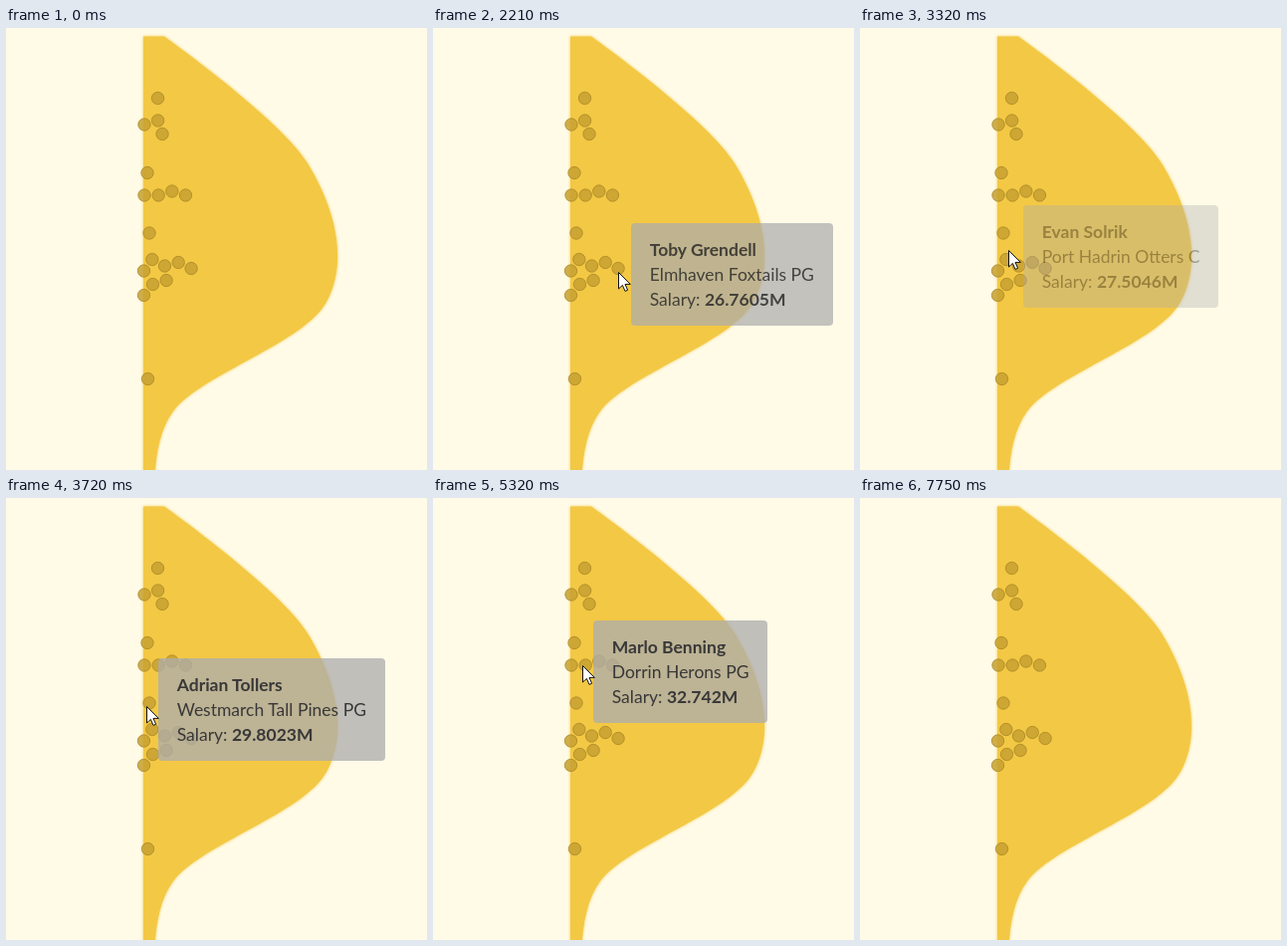
An HTML page for the animation above (8.38 s loop, 423 by 444 pixels).

```html
<!DOCTYPE html>
<html lang="en">
<head>
<meta charset="utf-8">
<title>Salary distribution</title>
<style>
html, body { margin: 0; width: 100%; height: 100%; overflow: hidden; background: #fffbe7; }
svg { position: absolute; left: 0; top: 0; }
#area { fill: #f3c844; filter: drop-shadow(0 0 1.5px #f3c844); }
#tip {
  position: absolute; left: 0; top: 0; padding: 14px 18.75px;
  border-radius: 4px; background: rgba(173, 173, 173, .77); color: #383838;
  font: 17.5px/25px Lato, sans-serif; white-space: nowrap;
}
</style>
</head>
<body>
<svg width="423" height="444">
  <path id="area"/>
  <g id="dots" fill="rgba(197,160,48,.85)" stroke="rgba(172,137,40,.8)"></g>
</svg>
<div id="tip"></div>
<svg width="423" height="444">
  <path id="pointer" d="M.5 .5V17L4.4 13.4L7 19.4L9.6 18.3L7 12.4H12.3Z" fill="#fff" stroke="#111"/>
</svg>
<script>
const LOOP = 8380, FADE = 190, AXIS = 138, LINK = 14.2;
const $ = id => document.getElementById(id);
const clamp = v => Math.max(0, Math.min(1, v));

// Density outline: a Catmull-Rom spline through a few points
function spline(points) {
  const pull = i => [0, 1].map(n =>
    points[i - 1] && points[i + 1] ? (points[i + 1][n] - points[i - 1][n]) / 6 : 0);
  return points.slice(1).map((p, i) => {
    const a = points[i], u = pull(i), v = pull(i + 1);
    return `C${a[0] + u[0]} ${a[1] + u[1]} ${p[0] - v[0]} ${p[1] - v[1]} ${p}`;
  }).join('');
}
const outline = [[159, 8.5], [303, 136], [322, 275], [168, 385], [152, 500]];
$('area').setAttribute('d', `M${AXIS} 8.5H159${spline(outline)}H${AXIS}Z`);

// Each swarm starts near the axis; every further dot touches the one before it
function swarm(inset, ...ys) {
  let x = AXIS + inset;
  ys.forEach((y, i) => {
    if (i) x += Math.sqrt(LINK ** 2 - (y - ys[i - 1]) ** 2);
    $('dots').innerHTML += `<circle cx="${x}" cy="${y}" r="6.2"/>`;
  });
}
swarm(14.5, 70.5);
swarm(1, 97, 93, 106.5);
swarm(4, 145.5);
swarm(1, 168, 168, 164, 168);
swarm(6, 206);
swarm(.5, 244, 232.5, 239, 235.5, 241.5);
swarm(.5, 268.5, 257.5, 253.5);
swarm(4.5, 352.5);

// The pointer rests at `at` from `on` to `off` while the tip at `box` is open
const visits = [
  { on: 1120, off: 2200, at: [188, 246], box: [199, 196], name: 'Toby Grendell', team: 'Elmhaven Foxtails PG', pay: 26.7605 },
  { on: 2420, off: 2900, at: [166, 234], box: [177, 184], name: 'Kyle-Bertram Holms', team: 'Brackenmoor Lanternfish C', pay: 27.285 },
  { on: 3230, off: 3410, at: [149, 223], box: [164, 178], name: 'Evan Solrik', team: 'Port Hadrin Otters C', pay: 27.5046 },
  { on: 3520, off: 4700, at: [141, 209], box: [153, 161], name: 'Adrian Tollers', team: 'Westmarch Tall Pines PG', pay: 29.8023 },
  { on: 5120, off: 7500, at: [150, 168], box: [161, 123], name: 'Marlo Benning', team: 'Dorrin Herons PG', pay: 32.742 }
];
const enter = { off: 70, at: [368, 446] };
const leave = { on: 7740, at: [290, 450] };
const route = [enter, ...visits, leave];

// Between rests x eases out while y runs evenly, which bends the path
function pointerAt(t) {
  const i = route.findIndex(r => r.on > t);
  if (i < 0 || t < enter.off) return [-50, -50];
  const a = route[i - 1], b = route[i];
  const k = clamp((t - a.off) / (b.on - a.off));
  const mix = (n, e) => Math.round(a.at[n] + (b.at[n] - a.at[n]) * e);
  return [mix(0, 1 - (1 - k) ** 2), mix(1, k)];
}

let shown;
function showTip(visit) {
  shown = visit;
  const [x, y] = visit.box;
  $('tip').style.transform = `translate(${x}px, ${y}px)`;
  $('tip').innerHTML = `<b>${visit.name}</b><br>${visit.team}<br>Salary: <b>${visit.pay}M</b>`;
}

function draw() {
  const t = performance.now() % LOOP;
  const visit = visits.filter(v => v.on <= t).pop() || visits[0];
  if (visit !== shown) showTip(visit);
  const fade = Math.min(t - visit.on, visit.off + FADE - t) / FADE;
  $('tip').style.opacity = clamp(fade);
  $('pointer').setAttribute('transform', `translate(${pointerAt(t)})`);
  requestAnimationFrame(draw);
}
draw();
</script>
</body>
</html>
```
